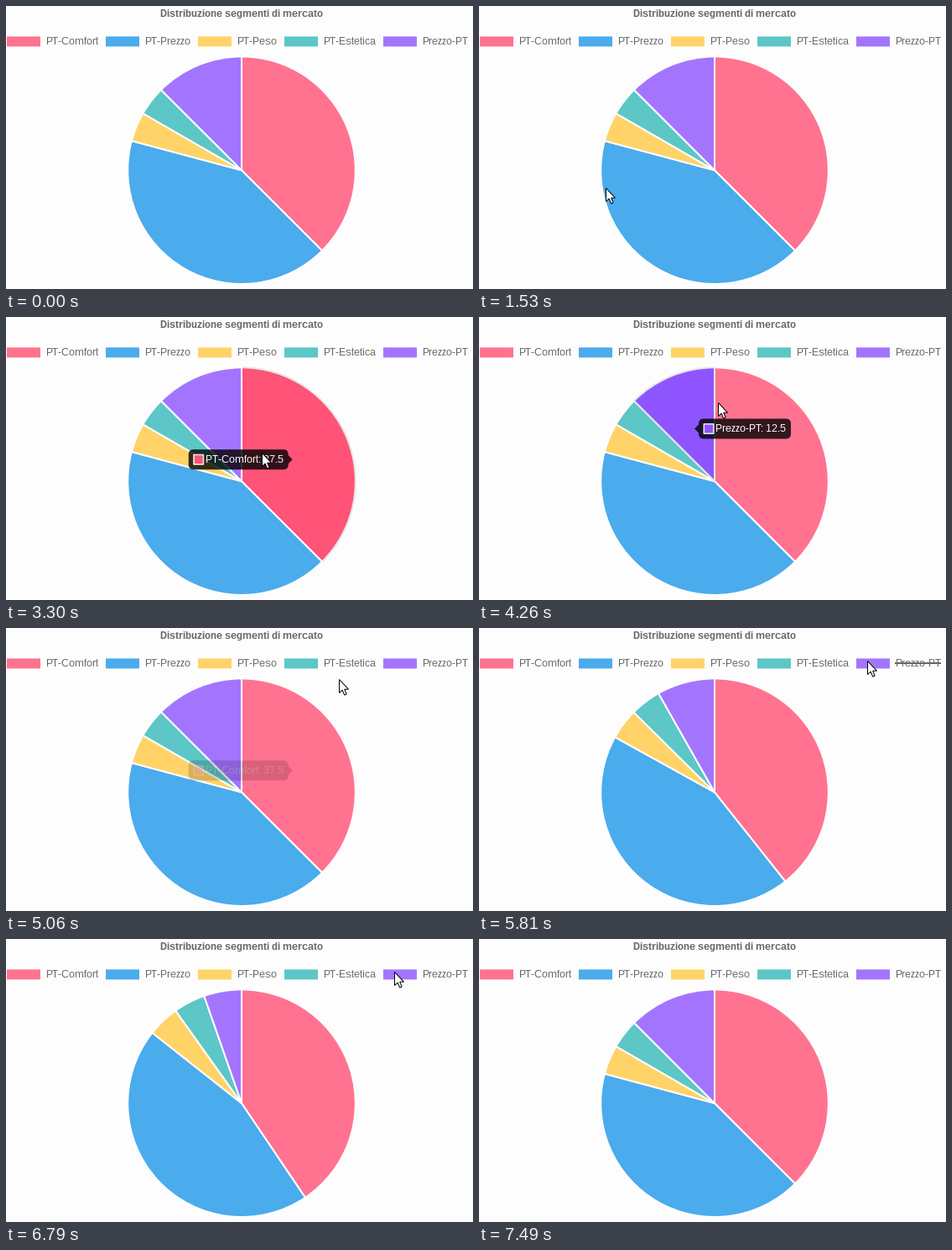
Write a matplotlib script that moves like this. It is 557 px wide and 338 px high and loops after 8.91 s.

```python
import colorsys

import matplotlib.pyplot as plt
import numpy as np
from matplotlib.animation import FuncAnimation
from matplotlib.colors import to_rgb
from matplotlib.patches import PathPatch, Polygon, Rectangle, Wedge
from matplotlib.path import Path

W, H, DPI = 557, 338, 64
PX = 72 / DPI  # points per pixel
LOOP, STEP = 8910, 30

CX, CY, R = 281, 196.2, 135.8
GREY, RIM, HOVER_RIM = "#666666", "#ffffff", "#e6e6e6"

# Name, votes, colour, legend position
SEGMENTS = [("PT-Comfort", 9, "#ff6384", 1),
            ("PT-Prezzo", 10, "#36a2eb", 119),
            ("PT-Peso", 1, "#ffce56", 229),
            ("PT-Estetica", 1, "#4bc0c0", 332),
            ("Prezzo-PT", 3, "#9966ff", 450)]
NAMES, VOTES, COLORS, LEGEND_X = zip(*SEGMENTS)
TOTAL = sum(VOTES)

# Hover changes: (time, slice); the tooltip fades from HOVER_END.
HOVERS = [(1600, 1), (2383.3, 4), (2470, 0), (3680, 4), (4340, 0)]
HOVER_END = 4905
TIP_MS, PIE_MS = 400, 1000
HIDE, SHOW, LAG = 5690, 6650, 50

# Pointer moves: start, end, x, y of arrival
ENTER, LEAVE = (0, 123), 7440
MOVES = [(870, 1530, 151, 217), (1530, 2400, 286, 188),
         (2400, 2610, 320, 180), (2870, 3020, 308, 173),
         (3200, 3860, 285, 102), (4260, 4900, 374, 84),
         (4900, 5040, 397, 61), (5100, 5510, 463, 39),
         (6900, LEAVE, 557, 22)]
ARROW = np.array([(0, 0), (0, 16), (3.6, 12.6), (6.2, 18.6), (8.6, 17.5),
                  (6.2, 11.7), (11, 11.7)]) + 0.5


def ramp(t, start, length):
    return np.clip((t - start) / length, 0, 1)


def ease(t, start, length):
    return 1 - (1 - ramp(t, start, length)) ** 4


def on_white(rgb, alpha=0.9):
    return tuple(alpha * c + 1 - alpha for c in rgb)


def hover_tone(rgb):
    h, l, s = colorsys.rgb_to_hls(*rgb)
    return colorsys.hls_to_rgb(h, l * 0.9, min(1, s * 1.5))


def edges(votes):
    return 360 * np.cumsum([0, *votes]) / sum(votes)


FILL = [on_white(to_rgb(c)) for c in COLORS]
HOVER = [on_white(hover_tone(to_rgb(c))) for c in COLORS]
ALL, WITHOUT = edges(VOTES), edges([*VOTES[:-1], 0])

plt.rcParams.update({"font.family": "Liberation Sans",
                     "text.hinting": "native", "text.hinting_factor": 1})
fig = plt.figure(figsize=(W / DPI, H / DPI), dpi=DPI, facecolor="#fdfdfd")
ax = fig.add_axes([0, 0, 1, 1])
ax.set(xlim=(0, W), ylim=(H, 0))
ax.axis("off")


def label(x, y, s, **kw):
    kw = {"color": GREY, "fontsize": 12 * PX, "va": "baseline", **kw}
    return ax.text(x, y, s, **kw)


def box(x, y, w, h, **kw):
    return ax.add_patch(Rectangle((x, y), w, h, snap=False, **kw))


label(CX, 13, "Distribuzione segmenti di mercato", weight="bold", ha="center")
for x, name, color in zip(LEGEND_X, NAMES, FILL):
    box(x, 36.4, 40, 12, fc=color, lw=0)
    legend_text = label(x + 46, 46, name)

renderer = fig.canvas.get_renderer()


def text_width(text):
    return text.get_window_extent(renderer).width


strike_x = LEGEND_X[-1] + 46
strike, = ax.plot([strike_x, strike_x + text_width(legend_text)], [42, 42],
                  color=GREY, lw=2 * PX, solid_capstyle="butt")

slices = [ax.add_patch(Wedge((CX, CY), R, 0, 1, lw=2 * PX, joinstyle="bevel",
                             zorder=1)) for _ in NAMES]
bubble = ax.add_patch(PathPatch(Path([(0, 0)]), fc="black", lw=0, zorder=4))
swatch = box(0, 0, 12, 12, fc="white", ec=HOVER_RIM, lw=PX, zorder=5,
             joinstyle="miter")
swatch_fill = box(0, 0, 10, 10, lw=0, zorder=5.1)
tip_text = label(0, 0, "", color="white", zorder=5.2)
pointer = ax.add_patch(Polygon(ARROW, fc="white", ec="black", lw=PX,
                               joinstyle="miter", zorder=9))


def tip_label(i):
    return f"{NAMES[i]}: {round(100 * VOTES[i] / TOTAL, 2):g}"


def tip_goal(i):
    """Resting x, y and width of the tooltip of one slice."""
    tip_text.set_text(tip_label(i))
    w = text_width(tip_text) + 26
    a = np.radians((ALL[i] + ALL[i + 1]) / 2)
    x, y = CX + R / 2 * np.sin(a), CY - R / 2 * np.cos(a)
    return np.array([x + 7 if x < CX else x - 7 - w, y - 12, w])


GOALS = {i: tip_goal(i) for _, i in HOVERS}


def tip_box(t):
    """Chase each hovered slice in turn, from wherever the last one led."""
    pos = GOALS[HOVERS[0][1]]
    stops = [start for start, _ in HOVERS[1:]] + [LOOP]
    for (start, i), stop in zip(HOVERS, stops):
        pos = pos + (GOALS[i] - pos) * ease(min(t, stop), start, TIP_MS)
    return pos


def bubble_path(x, y, w, left, h=24, r=6, c=5):
    x2, y2, m = x + w, y + h, y + h / 2
    pts, codes = [(x + r, y)], [Path.MOVETO]

    def line(*ps):
        pts.extend(ps)
        codes.extend([Path.LINETO] * len(ps))

    def corner(*ps):
        pts.extend(ps)
        codes.extend([Path.CURVE3] * 2)

    line((x2 - r, y))
    corner((x2, y), (x2, y + r))
    if not left:
        line((x2, m - c), (x2 + c, m), (x2, m + c))
    line((x2, y2 - r))
    corner((x2, y2), (x2 - r, y2))
    line((x + r, y2))
    corner((x, y2), (x, y2 - r))
    if left:
        line((x, m + c), (x - c, m), (x, m - c))
    line((x, y + r))
    corner((x, y), (x + r, y))
    return Path(pts, codes)


def hovered(t):
    past = [i for start, i in HOVERS if start <= t]
    return past[-1] if past else None


def draw_pie(t):
    active = hovered(t) if t < HOVER_END else None
    if t < SHOW + LAG:
        k = ease(t, HIDE, PIE_MS) if t >= HIDE + LAG else 0
    else:
        k = 1 - ease(t, SHOW, PIE_MS)
    angles = ALL + (WITHOUT - ALL) * k - 90
    for i, s in enumerate(slices):
        s.set_theta1(angles[i])
        s.set_theta2(max(angles[i], angles[i + 1]))
        s.set_facecolor(HOVER[i] if i == active else FILL[i])
        s.set_edgecolor(HOVER_RIM if i == active else RIM)
    strike.set_visible(HIDE + LAG <= t < SHOW + LAG)


def draw_tip(t):
    alpha = ease(t, HOVERS[0][0], TIP_MS) * (1 - ease(t, HOVER_END, TIP_MS))
    for part in (bubble, swatch, swatch_fill, tip_text):
        part.set_visible(alpha > 0.01)
        part.set_alpha(alpha)
    if alpha <= 0.01:
        return
    i = hovered(t)
    x, y, w = tip_box(t)
    bubble.set_path(bubble_path(x, y, w, left=i != 0))
    bubble.set_alpha(0.8 * alpha)
    swatch.set_xy((x + 6, y + 6))
    swatch_fill.set_xy((x + 7, y + 7))
    swatch_fill.set_facecolor(HOVER[i])
    tip_text.set_text(tip_label(i))
    tip_text.set_position((x + 20, y + 15.5))


def draw_pointer(t):
    pos = np.array(ENTER, float)
    for start, end, x, y in MOVES:
        pos += ((x, y) - pos) * ramp(t, start, end - start)
    pointer.set_visible(MOVES[0][0] <= t < LEAVE)
    pointer.set_xy(ARROW + np.round(pos))


def draw(n):
    t = n * STEP
    draw_pie(t)
    draw_tip(t)
    draw_pointer(t)
    return []


anim = FuncAnimation(fig, draw, frames=LOOP // STEP, interval=STEP,
                     init_func=lambda: draw(0), repeat=True, repeat_delay=0)
plt.show()
```
